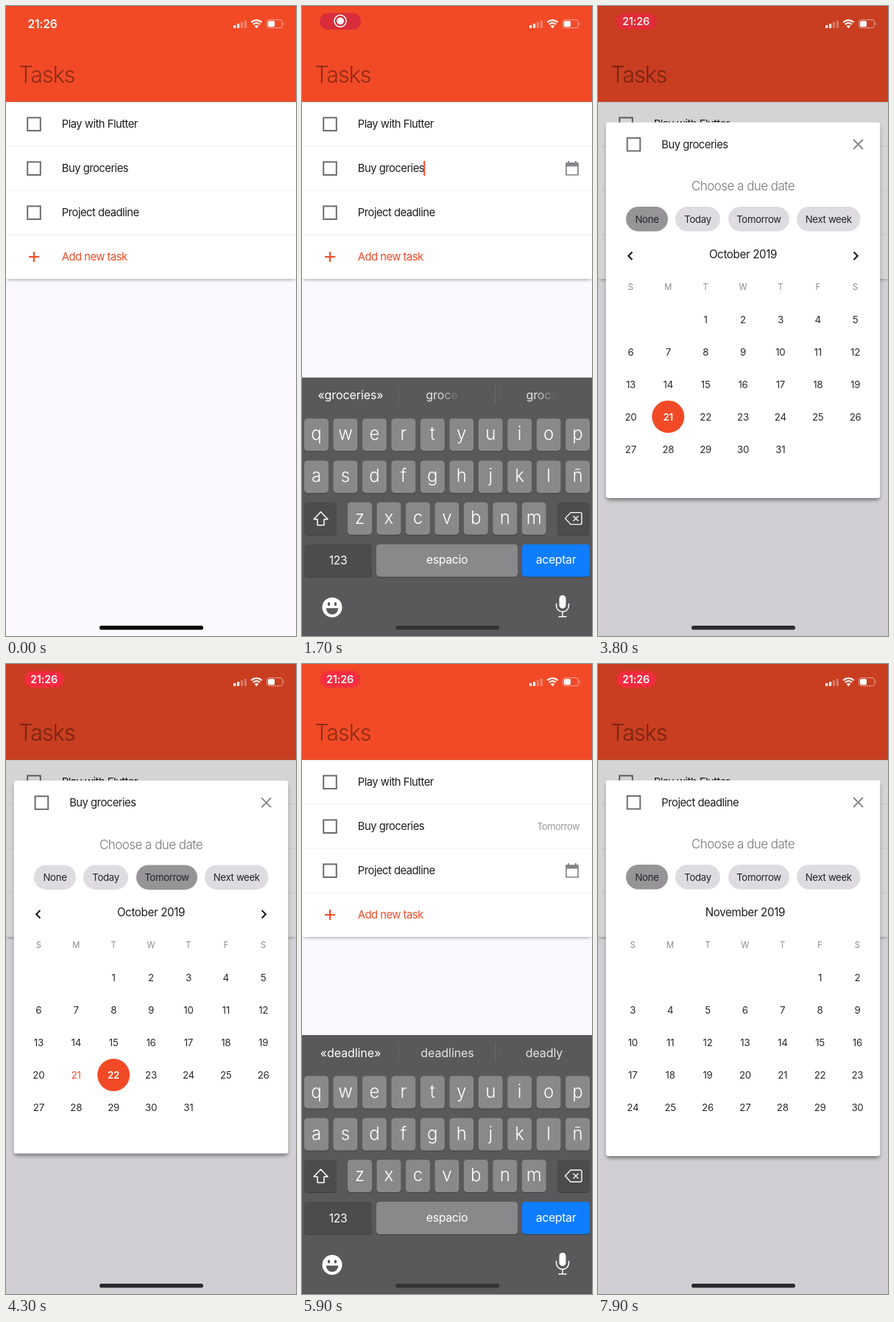
These frames come from a looping animation (394x854 px, 8 s). An HTML page:

```html
<!DOCTYPE html>
<html lang="en">
<head>
<meta charset="utf-8">
<title>Tasks</title>
<style>
html, body { margin: 0; width: 100%; height: 100%; overflow: hidden; background: #fbf9fd; }
svg { display: block; width: 100vw; height: 100vh; font-family: Inter, Roboto, sans-serif; }
</style>
</head>
<body>
<svg viewBox="0 0 394 854" xmlns="http://www.w3.org/2000/svg">
  <defs>
    <filter id="soft" x="-20%" y="-20%" width="140%" height="140%"><feGaussianBlur stdDeviation="2.5"/></filter>
    <filter id="glow" x="-20%" y="-40%" width="140%" height="180%"><feGaussianBlur stdDeviation="1.8"/></filter>
    <clipPath id="panelClip"><rect id="panelBox" rx="4"/></clipPath>
    <clipPath id="pageClip"><rect id="pageBox"/></clipPath>
  </defs>
  <g id="list"></g>
  <rect id="scrim" width="394" height="854"/>
  <g id="panel"></g>
  <g id="keyboard"></g>
  <g id="status"></g>
  <rect id="home" x="127" y="840" width="141" height="5.6" rx="2.8"/>
</svg>
<script>
const LOOP = 8000, ACCENT = '#f24a27', INK = '#1e1c20', GREY = '#858387';
const $ = id => document.getElementById(id);
const clamp = v => Math.max(0, Math.min(1, v));
const ramp = (t, start, length) => clamp((t - start) / length);
const out = u => 1 - (1 - u) ** 3;
const inOut = u => u * u * (3 - 2 * u);
const mix = (a, b, u) => a + (b - a) * u;
const set = (el, attrs) => { for (const k in attrs) el.setAttribute(k, attrs[k]); };

const rect = (x, y, w, h, fill, extra = '') =>
  `<rect x="${x}" y="${y}" width="${w}" height="${h}" fill="${fill}" ${extra}/>`;
const line = (d, color, width = 2, extra = '') =>
  `<path d="${d}" fill="none" stroke="${color}" stroke-width="${width}" ${extra}/>`;
function text(s, x, y, size, fill, { anchor = 'middle', weight = 400, gap = -0.02 } = {}) {
  return `<text x="${x}" y="${y}" font-size="${size}" fill="${fill}" text-anchor="${anchor}" ` +
    `font-weight="${weight}" letter-spacing="${gap}em">${s}</text>`;
}
const fade = (body, alpha) => alpha > 0 ? `<g opacity="${alpha}">${body}</g>` : '';

const TASKS = [
  { name: 'Play with Flutter', y: 130 },
  { name: 'Buy groceries', y: 190, caret: 166, words: ['«groceries»', 'grocery', 'grocer'] },
  { name: 'Project deadline', y: 250, caret: 182, words: ['«deadline»', 'deadlines', 'deadly'] }
];
const EDITS = [
  { task: TASKS[1], focus: 1350, caretOn: 1460, tap: 2468, pick: 4080, close: 4280 },
  { task: TASKS[2], focus: 5103, caretOn: 5120, tap: 5968, pick: Infinity, close: Infinity }
];

const label = (name, x, y, color = INK) =>
  text(name, x, y, 14.8, color, { anchor: 'start', gap: -0.035 });
const checkbox = (x, y) => rect(x + 29.2, y + 21.4, 17.6, 17.6, 'none', 'stroke="#6e6c70" stroke-width="2"');
const taskBody = (name, x, y) => checkbox(x, y) + label(name, x + 75.8, y + 35.2);
const calendarIcon = (x, y) => line(`M${x - 8} ${y - 7}h16v16h-16z`, GREY, 1.7) +
  rect(x - 8.5, y - 7.5, 17, 5, GREY) + line(`M${x - 4.8} ${y - 10}v3m9.6 -3v3`, GREY, 2);

function caretAlpha(t, start) {
  if (t < start) return 0;
  const step = Math.floor((t - start) / 505), u = ramp((t - start) % 505, 0, 250);
  if (!step) return 1;
  return step % 2 ? 1 - out(u) : inOut(u);
}

function drawList(t, edit, open) {
  let s = rect(0, 0, 394, 854, '#fbf9fd') +
    rect(2, 350, 390, 20.5, '#000', 'opacity=".42" filter="url(#soft)"') +
    rect(0, 130, 394, 240, '#fff', 'rx="2"') + rect(0, 0, 394, 130, ACCENT) +
    rect(0, 129.5, 394, 1, '#7a4a40', 'opacity=".25"') +
    text('Tasks', 17.2, 103.5, 30.5, '#8e2b16', { anchor: 'start', weight: 350, gap: -0.035 });
  for (const y of [190, 250, 310]) s += rect(0, y - .5, 394, 1, '#f0eef2');
  for (const task of TASKS) {
    const active = edit && edit.task === task;
    if (active && open > 0) continue;
    s += taskBody(task.name, 0, task.y);
    if (active && t < edit.tap + 300) {
      s += fade(calendarIcon(367, task.y + 30), ramp(t, edit.focus, 80));
      s += fade(rect(task.caret - .8, task.y + 20, 2, 20, ACCENT), caretAlpha(t, edit.caretOn));
    }
    if (task === TASKS[1] && t > EDITS[0].close)
      s += text('Tomorrow', 377, task.y + 35, 12.9, '#9b999d', { anchor: 'end', gap: -0.04 });
  }
  s += line('M31 340h14m-7 -7v14', ACCENT, 2.1) + label('Add new task', 75.8, 345.2, ACCENT);
  $('list').innerHTML = s;
}

const chip = (name, x, w, on) => rect(x, 114.5, w, 33.5, on ? '#969497' : '#dedce0', 'rx="16.75"') +
  text(name, x + w / 2, 136.3, 13.2, '#242226', { gap: -0.025 });

function monthPage(title, first, days, cell, dx, picked, today) {
  const at = c => 197 + dx + (c - 3) * cell;
  let s = text(title, 197 + dx, 184, 15.2, INK, { gap: -0.025 });
  [...'SMTWTFS'].forEach((d, c) => s += text(d, at(c), 227.3, 11.2, '#8a888c', { gap: 0 }));
  for (let d = 1; d <= days; d++) {
    const slot = first + d - 1, x = at(slot % 7), y = 267.5 + 44 * Math.floor(slot / 7);
    if (d === picked) s += `<circle cx="${x}" cy="${y - .3}" r="22" fill="${ACCENT}"/>`;
    const color = d === picked ? '#fff' : d === today ? ACCENT : '#2b292d';
    s += text(d, x, y + 4.7, 13.3, color, { weight: d === picked ? 600 : 400 });
  }
  return s;
}

function drawPanel(t, edit, open, lift) {
  if (open <= 0) { $('panel').innerHTML = ''; return; }
  const x = mix(0, 10.5, open), w = 394 - 2 * x;
  const y = mix(edit.task.y, 157.5, open ** 1.5), h = mix(60, 509.5, lift);
  const cell = (w - 17) / 7, pageW = w - 17;
  const swipe = inOut(ramp(t, 7200, 740)), slide = -swipe * pageW;
  const arrows = 1 - ramp(t, 7200, 200);
  const tomorrow = t >= edit.pick;
  set($('panelBox'), { x, y: 0, width: w, height: h });
  set($('pageBox'), { x: x + 8.5, y: 160, width: pageW, height: 340 });

  const body = text('Choose a due date', 197, 92.7, 17, '#77757a', { weight: 300, gap: -0.032 }) +
    chip('None', 38, 57, !tomorrow) + chip('Today', 105, 61, false) +
    chip('Tomorrow', 177, 83, tomorrow) + chip('Next week', 270, 86.5, false) +
    '<g clip-path="url(#pageClip)">' +
    (swipe < 1 ? monthPage('October 2019', 2, 31, cell, slide, tomorrow ? 22 : 21, 21) : '') +
    (swipe > 0 ? monthPage('November 2019', 5, 30, cell, slide + pageW, 0, 0) : '') + '</g>' +
    fade(line(`M${x + 36} 176l-5.2 5.3 5.2 5.3M${394 - x - 36} 176l5.2 5.3 -5.2 5.3`, '#1b1a1c', 2.1), arrows);
  const cross = line(`M${x + w - 36.5} 23.5l13 13m0 -13l-13 13`, GREY, 1.8);

  $('panel').innerHTML = `<g transform="translate(0 ${y})">` +
    rect(x + 1, 4, w - 2, h - 1, '#000', 'rx="4" opacity=".42" filter="url(#soft)"') +
    '<g clip-path="url(#panelClip)">' + rect(x, 0, w, h, '#fff') +
    taskBody(edit.task.name, x, 0) + fade(cross, lift) + fade(body, ramp(lift, .15, .6)) + '</g></g>';
}

const key = (x, y, w, fill) => rect(x, y + 1, w, 44, '#3f3e40', 'rx="4.5"') + rect(x, y, w, 44, fill, 'rx="4.5"');
function buildKeys() {
  const plain = '#89888a', dark = '#4c4b4e';
  let s = rect(0, 0, 394, 360, '#59585a') + rect(130.5, 10, 1, 26, '#6b6a6c') + rect(262, 10, 1, 26, '#6b6a6c');
  const row = (letters, x, y) => [...letters].forEach((c, i) => {
    const kx = x + i * 39.45;
    s += key(kx, y, 33, plain) + text(c, kx + 16.5, y + 29, 24, '#fff', { weight: 350, gap: 0 });
  });
  row('qwertyuiop', 3, 55.5);
  row('asdfghjklñ', 3, 112.5);
  row('zxcvbnm', 62, 169);
  s += key(3, 169, 44, dark) + key(347, 169, 44, dark) + key(3, 226, 92, dark) +
    key(101, 226, 192, plain) + key(299, 226, 92, '#0f7dff') +
    text('123', 49, 253.5, 15.6, '#fff') + text('espacio', 197, 252.7, 15.8, '#fff') +
    text('aceptar', 345, 252.7, 15.8, '#fff') +
    line('M25.5 182l9.5 10h-5v8h-9v-8h-5z', '#fff', 1.5, 'stroke-linejoin="round"') +
    line('M365 183h13q2 0 2 2v12q0 2 -2 2h-13l-7.5 -8zm3.5 4.5l7 7m0 -7l-7 7', '#fff', 1.4, 'stroke-linejoin="round"') +
    '<circle cx="41" cy="311.5" r="13.5" fill="#fff"/>' +
    '<ellipse cx="36.5" cy="307" rx="1.7" ry="2.6" fill="#59585a"/><ellipse cx="45.5" cy="307" rx="1.7" ry="2.6" fill="#59585a"/>' +
    '<path d="M32.5 312.5h17q-1.5 8.5 -8.5 8.5t-8.5 -8.5z" fill="#59585a"/>' +
    rect(349.5, 295, 9, 18, '#fff', 'rx="4.5"') +
    line('M345.5 306v3a8.5 8.5 0 0 0 17 0v-3M354 317.5v6M348.5 324h11', '#fff', 1.5);
  return s;
}
$('keyboard').innerHTML = buildKeys() + '<g id="words"></g>';

const word = (s, i, fill = '#fff') => text(s, 66 + i * 131.5, 29.7, 16, fill, { gap: -0.005 });
// Letters appear or vanish one after another.
function wipeWord(s, i, u) {
  const spans = [...s].map((c, n) =>
    `<tspan fill-opacity="${clamp(u * (s.length + 3) / 3 - n / 3)}">${c}</tspan>`).join('');
  return word(spans, i, '#e6e5e7');
}

function drawKeyboard(t, edit) {
  const shown = edit ? out(ramp(t, edit.focus, 400)) * (1 - out(ramp(t, edit.tap, 400))) : 0;
  $('keyboard').setAttribute('visibility', shown > 0.001 ? 'visible' : 'hidden');
  if (!edit) return 0;
  $('keyboard').setAttribute('transform', `translate(0 ${mix(854, 503, shown)})`);
  const [main, ...rest] = edit.task.words;
  let s = '';
  if (edit === EDITS[1]) {
    const swap = ramp(t, edit.focus, 120), old = EDITS[0].task.words;
    s += fade(word(old[0], 0), .8 * (1 - swap)) + fade(word(main, 0), swap);
    old.slice(1).forEach((w, i) => s += fade(wipeWord(w, i + 1, 1 - ramp(t, edit.focus, 155)), .7));
  } else s += word(main, 0);
  rest.forEach((w, i) => s += wipeWord(w, i + 1, ramp(t, edit.focus + 220, 280)));
  $('words').innerHTML = s;
  return shown;
}

function drawStatus(t) {
  let s = '';
  if (t < 250) {
    s += text('21:26', 49.5, 30, 15.6, '#fff', { weight: 600, gap: -0.01 });
  } else {
    const pulse = .5 - .5 * Math.cos((t - 1700) / 1750 * 2 * Math.PI);
    s += fade(rect(24, 9.5, 56, 22.5, '#d92c3a', 'rx="11"'), 1 - .75 * pulse) +
      fade(rect(26, 10, 52, 21.5, '#fa2c42', 'rx="10" filter="url(#glow)"'), pulse);
    const clock = ramp(t, 3150, 350);
    s += fade('<circle cx="52" cy="20.3" r="8" fill="none" stroke="#fff" stroke-width="1.5"/>' +
      '<circle cx="52" cy="20.3" r="4.9" fill="#fff"/>', 1 - clock);
    s += fade(text('21:26', 51.5, 26, 14.4, '#fff', { weight: 600, gap: -0.01 }), clock * mix(.85, 1, pulse));
  }
  for (let i = 0; i < 4; i++)
    s += rect(309 + i * 4.9, 26 - i * 2.1, 3.2, 4 + i * 2.1, '#fff', `rx=".8" opacity="${i < 2 ? 1 : .3}"`);
  s += line('M333.2 22.2a10 10 0 0 1 14.2 0M335.8 25a6.2 6.2 0 0 1 9 0', '#fff', 2.1) +
    '<path d="M340.3 30.2l-2.7 -2.8a3.8 3.8 0 0 1 5.4 0z" fill="#fff"/>' +
    rect(354.5, 18.7, 21, 11, 'none', 'rx="3" stroke="#fff" stroke-opacity=".5"') +
    rect(356, 20.2, 9, 8, '#fff', 'rx="1.6"') +
    '<path d="M377 22.3q2 1.9 0 3.8z" fill="#fff" opacity=".5"/>';
  $('status').innerHTML = s;
}

function draw(t) {
  const edit = [...EDITS].reverse().find(e => t >= e.focus);
  let open = 0, lift = 0, dim = 0;
  if (edit) {
    const back = inOut(ramp(t, edit.close, 400));
    const start = edit.tap + 55;
    open = inOut(ramp(t, start, 365)) * (1 - back);
    lift = inOut(ramp(t, start, 270)) * (1 - back);
    dim = ramp(t, start, 220) * (1 - back);
  }
  drawList(t, edit, open);
  $('scrim').setAttribute('opacity', .17 * dim);
  drawPanel(t, edit, open, lift);
  const shown = drawKeyboard(t, edit);
  drawStatus(t);
  $('home').setAttribute('fill', shown > .5 ? '#333234' : dim > .5 ? '#2b2a2c' : '#000');
}

const begin = performance.now();
function tick() {
  draw((performance.now() - begin) % LOOP);
  requestAnimationFrame(tick);
}
tick();
</script>
</body>
</html>
```
